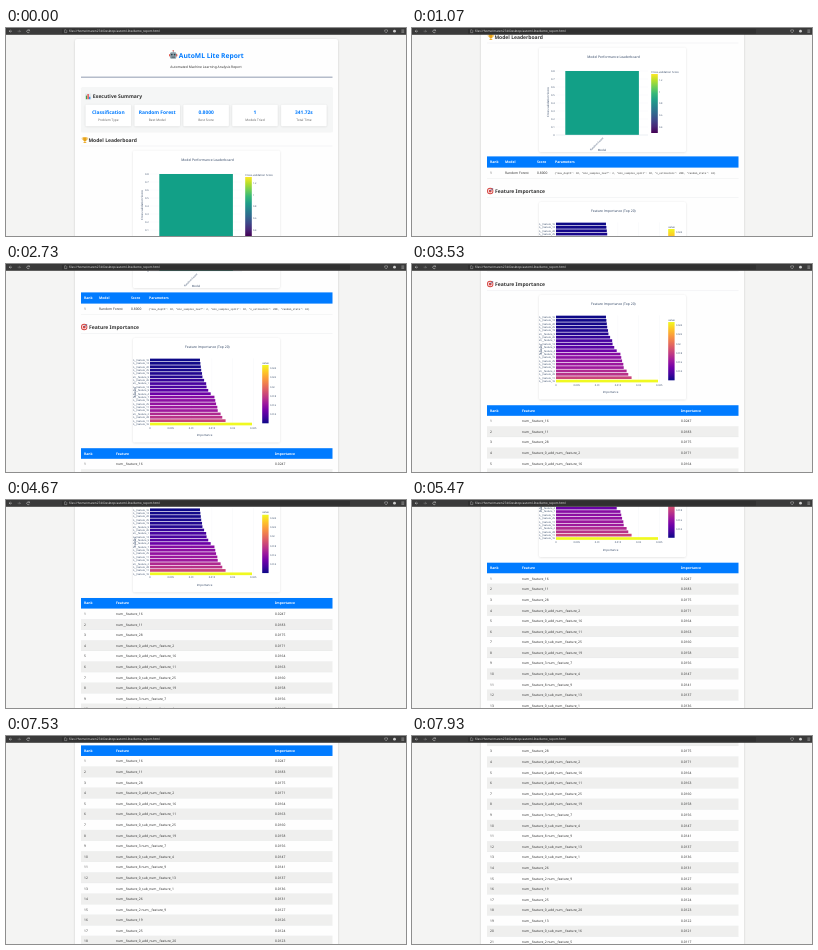
An HTML page for the animation above (8 s loop, 400x208 px).

```html
<!DOCTYPE html>
<html lang="en">
<head>
<meta charset="utf-8">
<title>AutoML Lite Report</title>
<style>
html, body { margin: 0; width: 100%; height: 100%; overflow: hidden; background: #f4f4f3; }
svg { display: block; width: 100vw; height: 100vh; }
text { font-family: "Noto Sans", "Open Sans", sans-serif; text-rendering: geometricPrecision; white-space: pre; }
.plot { font-family: "Open Sans", "Noto Sans", sans-serif; }
.code { font-family: "Noto Sans Mono", "DejaVu Sans Mono", monospace; }
</style>
</head>
<body>
<svg id="stage" viewBox="0 0 400 208" preserveAspectRatio="none">
  <defs>
    <linearGradient id="viridis" x1="0" y1="1" x2="0" y2="0"></linearGradient>
    <linearGradient id="plasma" x1="0" y1="1" x2="0" y2="0"></linearGradient>
    <filter id="soft" x="-10%" y="-10%" width="120%" height="120%"><feGaussianBlur stdDeviation="1.2"/></filter>
    <clipPath id="plotClip"><rect x="127" y="277" width="147" height="105"/></clipPath>
  </defs>
  <g id="page"></g>
  <g id="bar"></g>
</svg>
<script>
const NS = 'http://www.w3.org/2000/svg';
const BLUE = '#007bff', INK = '#333', MUTED = '#666';
const page = document.getElementById('page');
const bar = document.getElementById('bar');

function add(parent, tag, attrs, content) {
  const el = document.createElementNS(NS, tag);
  for (const key in attrs) el.setAttribute(key, attrs[key]);
  if (content !== undefined) el.textContent = content;
  parent.appendChild(el);
  return el;
}
const rect = (x, y, width, height, fill, more, parent = page) =>
  add(parent, 'rect', { x, y, width, height, fill, ...more });
const path = (d, more, parent = page) => add(parent, 'path', { d, fill: 'none', ...more });
const circle = (cx, cy, r, fill, parent = page) => add(parent, 'circle', { cx, cy, r, fill });

// Text is placed by the vertical centre of its capitals.
const label = (x, cy, str, size, more, parent = page) =>
  add(parent, 'text', { x, y: cy + size * 0.36, 'font-size': size, fill: INK, ...more }, str);
const MID = { 'text-anchor': 'middle' };
const END = { 'text-anchor': 'end' };
const BOLD = { 'font-weight': 700 };
const SEMI = { 'font-weight': 600 };
const PLOT = { class: 'plot', fill: '#2a3f5f' };

const PALETTES = {
  viridis: ['#440154', '#482878', '#3e4989', '#31688e', '#26828e', '#1f9e89', '#35b779', '#6ece58', '#b5de2b', '#fde725'],
  plasma: ['#0d0887', '#46039f', '#7201a8', '#9c179e', '#bd3786', '#d8576b', '#ed7953', '#fb9f3a', '#fdca26', '#f0f921']
};
for (const name in PALETTES) {
  PALETTES[name].forEach((color, i) =>
    add(document.getElementById(name), 'stop', { offset: i / 9, 'stop-color': color }));
}
function plasma(u) {
  const k = Math.min(8, Math.floor(u * 9)), f = u * 9 - k;
  const channel = (hex, c) => parseInt(hex.slice(1 + 2 * c, 3 + 2 * c), 16);
  const mix = [0, 1, 2].map(c => {
    const a = channel(PALETTES.plasma[k], c), b = channel(PALETTES.plasma[k + 1], c);
    return Math.round(a + (b - a) * f);
  });
  return `rgb(${mix})`;
}

function card(x, y, w, h, r = 1.6) {
  rect(x, y + 0.4, w, h, '#000', { rx: r, opacity: 0.12, filter: 'url(#soft)' });
  rect(x, y, w, h, '#fff', { rx: r });
}

function heading(x, cy, str) {
  label(x, cy, str, 5, BOLD);
}

function colorbar(x, y, w, h, name, title, ticks, lo, hi) {
  rect(x, y, w, h, `url(#${name})`);
  label(x, y - 2.4, title, 2.7, PLOT);
  ticks.forEach(v => label(x + w + 1.3, y + h * (hi - v) / (hi - lo), v, 2.4, PLOT));
}

function tableHead(y, h, cells) {
  rect(75, y, 251.5, h, BLUE);
  cells.forEach(([x, str]) => label(x, y + h / 2, str, 3.4, { fill: '#fff', ...SEMI }));
}

function drawHeader() {
  // robot
  rect(164.2, 24.4, 6, 6, '#8aa0ad', { rx: 1 });
  rect(163, 26, 8.4, 2.6, '#e0584f', { rx: 0.8 });
  rect(164.2, 24.4, 6, 6, '#90a4ae', { rx: 1 });
  circle(165.8, 26.6, 0.85, '#263c48');
  circle(168.6, 26.6, 0.85, '#263c48');
  rect(165.4, 28.7, 3.6, 0.8, '#37474f');
  rect(166.9, 22.8, 0.6, 1.7, '#607d8b');
  circle(167.2, 22.8, 0.7, '#e0584f');

  label(172.8, 27.3, 'AutoML Lite Report', 6.7, { fill: BLUE, ...BOLD });
  label(200, 39.2, 'Automated Machine Learning Analysis Report', 3.33, MID);
  rect(75, 48.8, 251.5, 0.6, '#47597c');
}

function drawSummary() {
  rect(75, 59, 252, 45.5, '#f5f6f6', { rx: 1.6 });
  rect(79, 65.4, 6.2, 6.2, '#e3e8ec', { rx: 0.5 });
  rect(79.9, 67.6, 1.2, 3.6, '#43a047');
  rect(81.5, 66, 1.2, 5.2, '#e53935');
  rect(83.1, 68.8, 1.2, 2.4, '#1e88e5');
  heading(86.8, 68.5, 'Executive Summary');
  [['Classification', 'Problem Type'], ['Random Forest', 'Best Model'], ['0.8000', 'Best Score'],
   ['1', 'Models Tried'], ['341.72s', 'Total Time']].forEach(([value, name], i) => {
    const cx = 102.3 + i * 48.9;
    card(cx - 22.8, 76.8, 45.6, 21.4, 1);
    label(cx, 84, value, 4.9, { fill: BLUE, ...BOLD, ...MID });
    label(cx, 91.6, name, 3.2, { fill: MUTED, ...MID });
  });
}

function drawLeaderboard() {
  // trophy
  path('M77.1 109.2h3.6v2.4a1.8 1.8 0 0 1-3.6 0z M78.5 113h.8v1.3h1v.8h-2.8v-.8h1z', { fill: '#e8a317' });
  path('M77.1 109.9h-1.1q0 2 1.4 2 M80.7 109.9h1.1q0 2-1.4 2', { stroke: '#e8a317', 'stroke-width': 0.5 });
  heading(82.4, 112, 'Model Leaderboard');
  rect(75, 117.8, 251.5, 0.4, '#e3e5e8');

  card(127, 122.5, 147, 104.5);
  label(201.5, 131.5, 'Model Performance Leaderboard', 3.4, { ...PLOT, ...MID });
  for (let i = 0; i <= 8; i++) {
    const y = 210 - i * 8;
    rect(144, y - 0.1, 92, 0.2, '#e6eaf0');
    label(142.6, y, i ? (i / 10).toFixed(1) : '0', 2.5, { ...PLOT, ...END });
  }
  rect(153.3, 146, 73.6, 64, '#12a087');
  rect(144, 209.8, 92, 0.4, '#d3dae4');
  label(0, 0, 'Cross-validation Score', 2.9, { ...PLOT, ...MID, transform: 'translate(136.4 177) rotate(-90)' });
  label(0, 0, 'Random Forest', 2.5, { ...PLOT, ...END, transform: 'translate(191 212.6) rotate(-45)' });
  label(190, 225, 'Model', 2.9, { ...PLOT, ...MID });
  colorbar(239.2, 149, 6.6, 59, 'viridis', 'Cross-validation Score', [0.4, 0.6, 0.8, 1, 1.2], 0.3, 1.3);

  tableHead(231.4, 11.2, [[78, 'Rank'], [93, 'Model'], [125, 'Score'], [143, 'Parameters']]);
  [[78, '1'], [93, 'Random Forest'], [125, '0.8000']].forEach(([x, str]) => label(x, 248, str, 3.33));
  label(142.5, 248, '{"max_depth": 10, "min_samples_leaf": 2, "min_samples_split": 10, "n_estimators": 200, "random_state": 42}',
    2.54, { class: 'code' });
  rect(75, 253.3, 251.5, 0.3, '#dcdfe2');
}

// "a+b" adds, "a-b" subtracts, "a b" combines two features.
const FEATURES = ['16', '11', '28', '0+2', '0+16', '0+11', '0-25', '0+19', '3 7', '0-4', '8 9', '0-13', '0-1',
  '26', '2 9', '19', '25', '0+20', '13', '0-16', '2 5', '22', '0+7']
  .map(s => 'num__feature_' + s.replace(/[+\- ]/, c => ({ '+': '_add_', '-': '_sub_', ' ': ' ' })[c] + 'num__feature_'));
const SCORES = [247, 183, 175, 171, 164, 163, 160, 158, 156, 147, 141, 137, 136, 131, 127, 126, 124, 123, 122, 121,
  117, 116, 115].map(v => v / 1e4);

function drawFeatures() {
  circle(78.2, 266, 3.2, '#d64541');
  circle(78.2, 266, 2.3, '#fff');
  circle(78.2, 266, 1.5, '#d64541');
  path('M78.2 266l3-3', { stroke: '#3f6fa8', 'stroke-width': 0.7 });
  heading(83, 266, 'Feature Importance');
  rect(75, 272.6, 251.5, 0.4, '#e3e5e8');

  card(127, 277, 147, 104.5);
  label(201.3, 286, 'Feature Importance (Top 20)', 3.4, { ...PLOT, ...MID });
  const scale = 4130, pitch = 3.37, top = 297.3;
  for (let i = 0; i <= 5; i++) {
    const x = 144 + i * 0.005 * scale;
    rect(x - 0.1, top, 0.2, 20 * pitch, '#e6eaf0');
    label(x, 366.8, String(i * 5 / 1000), 2.5, { ...PLOT, ...MID });
  }
  const names = add(page, 'g', { 'clip-path': 'url(#plotClip)' });
  for (let i = 0; i < 20; i++) {
    const y = top + (19 - i) * pitch;
    rect(144, y + pitch * 0.1, SCORES[i] * scale, pitch * 0.8, plasma((SCORES[i] - 0.0121) / 0.0126));
    label(143, y + pitch / 2, FEATURES[i], 2.5, { ...PLOT, ...END }, names);
  }
  label(0, 0, 'Feature', 2.9, { ...PLOT, ...MID, transform: 'translate(129.4 331) rotate(-90)' });
  label(198.5, 374, 'Importance', 2.9, { ...PLOT, ...MID });
  colorbar(256.2, 304, 6.4, 58.3, 'plasma', 'value', [0.014, 0.016, 0.018, 0.02, 0.022, 0.024], 0.0121, 0.0247);

  tableHead(387.2, 10.6, [[78, 'Rank'], [110, 'Feature'], [269, 'Importance']]);
  FEATURES.forEach((name, i) => {
    const y = 397.8 + i * 10.59, cy = y + 5.3;
    if (i % 2) rect(75, y, 251.5, 10.59, '#efefee');
    rect(75, y + 10.4, 251.5, 0.25, '#dfe1e3');
    label(78, cy, i + 1, 3.3);
    label(110, cy, name, 3.3);
    label(269, cy, SCORES[i].toFixed(4), 3.3);
  });
}

function drawBrowser() {
  rect(0, 0, 400, 6.8, '#3a3a3a', {}, bar);
  rect(56, 0.8, 288, 5, '#303030', { rx: 0.8 }, bar);
  const line = { stroke: '#d8d8d8', 'stroke-width': 0.5 };
  path('M6 3.2H3.2m1.2-1.2l-1.2 1.2 1.2 1.2', line, bar);
  path('M11.6 3.2h2.8m-1.2-1.2l1.2 1.2-1.2 1.2', { ...line, opacity: 0.5 }, bar);
  path('M23.3 2.4a1.4 1.4 0 1 0 .2 1.4M23.5 1.5v1.1h-1.1', line, bar);
  path('M58.6 1.8h1.5l.7.7v2.1h-2.2z', { ...line, 'stroke-width': 0.35 }, bar);
  label(63, 3.2, 'file:///home/maren274/Desktop/automl-lite/demo_report.html', 3.1, { fill: '#e4e4e4' }, bar);
  path('M378.6 2q1 0 1.5-.5.5.5 1.5.5 0 2-1.5 2.9-1.5-.9-1.5-2.9z', { ...line, 'stroke-width': 0.4 }, bar);
  circle(388.5, 3.2, 1.4, '#d0d0d0', bar);
  path('M395.4 2h2.8M395.4 3.2h2.8M395.4 4.4h2.8', { ...line, 'stroke-width': 0.4 }, bar);
}

rect(69, 11.4, 263, 720, '#000', { rx: 2, opacity: 0.16, filter: 'url(#soft)' });
rect(69, 11, 263, 720, '#fefefe', { rx: 2 });
drawHeader();
drawSummary();
drawLeaderboard();
drawFeatures();
drawBrowser();

// Scroll strokes: first tick, last tick, end position.
const LOOP = 8000, TICK = 200 / 3;
const STROKES = [[4, 7, 68], [14, 16, 103], [17, 22, 137], [29, 33, 172], [36, 41, 203], [44, 48, 234],
  [52, 56, 268], [65, 68, 286], [70, 74, 317], [81, 86, 346], [89, 93, 376], [113, 119, 409]];

function scrollAt(tick) {
  let pos = 0;
  for (const [first, last, end] of STROKES) {
    if (tick < first) break;
    const u = Math.min(1, (tick - first + 1) / (last - first + 1));
    pos += (end - pos) * u * u * (3 - 2 * u);
  }
  return pos;
}

function render(ms) {
  const tick = Math.floor((ms % LOOP + 4) / TICK);
  page.setAttribute('transform', `translate(0 ${-scrollAt(Math.min(tick, 119)).toFixed(2)})`);
}

const start = performance.now();
function loop() {
  render(performance.now() - start);
  requestAnimationFrame(loop);
}
render(0);
requestAnimationFrame(loop);
</script>
</body>
</html>
```
